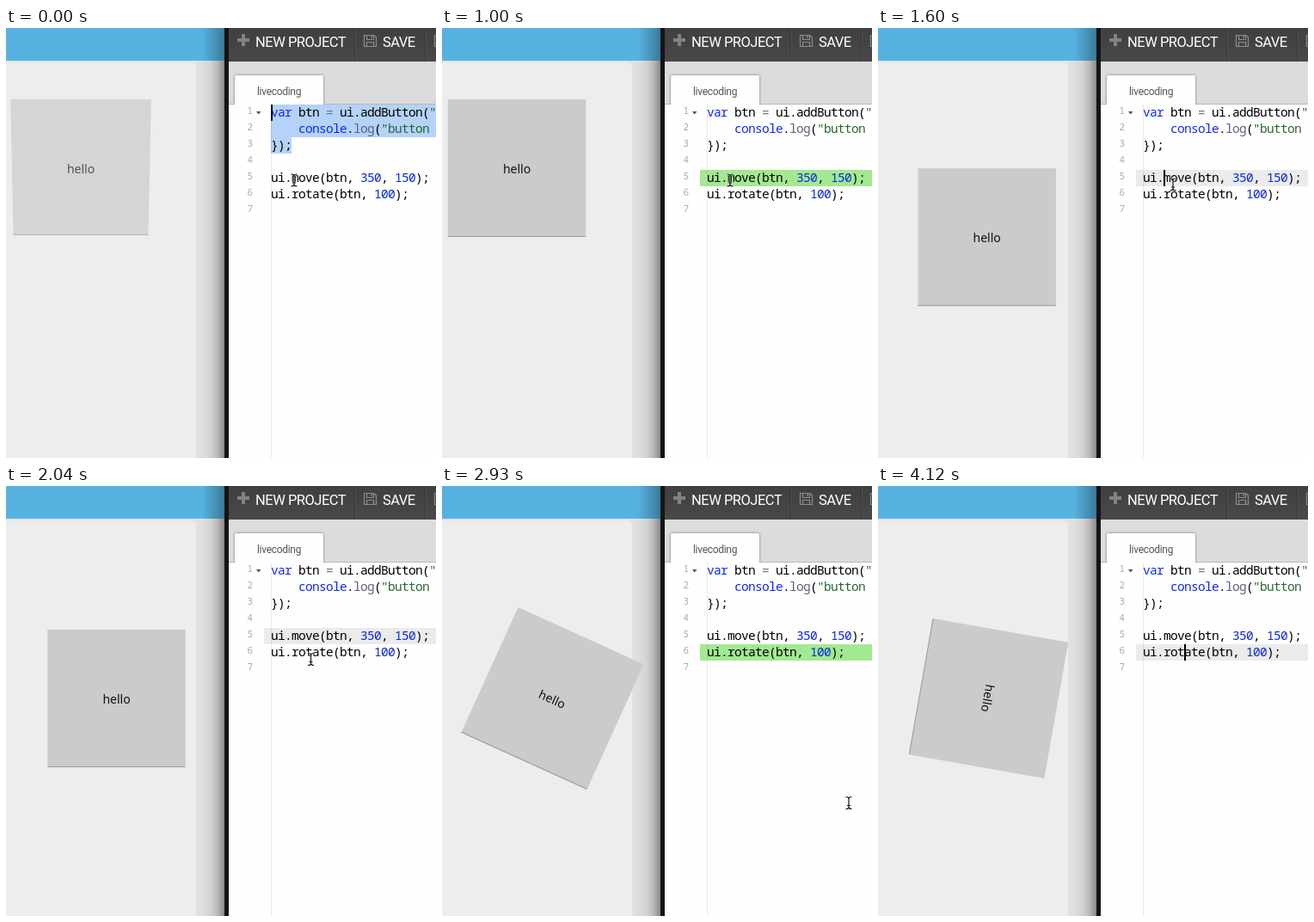
These frames come from a looping animation (500 px wide and 500 px high, 4.45 s). An HTML page:

```html
<!DOCTYPE html>
<html lang="en">
<head>
<meta charset="utf-8">
<title>Live coding</title>
<style>
  html, body { margin: 0; width: 100%; height: 100%; overflow: hidden; }
  svg { display: block; width: 500px; height: 500px; }
  .menu { font: 16.5px Roboto, sans-serif; letter-spacing: -.5px; fill: #fff; }
  .tab { font: 12px Roboto, sans-serif; letter-spacing: -.3px; fill: #555; }
  .hello { font: 14px "Noto Sans", sans-serif; text-anchor: middle; fill: #111; }
  .code { font: 14.5px "Noto Sans Mono", monospace; letter-spacing: -.7px; white-space: pre; fill: #000; }
  .numbers { font: 11px "Noto Sans Mono", monospace; text-anchor: end; fill: #aaa; }
  .keyword { fill: #1028f4; }
  .number { fill: #0a28dc; }
  .method { fill: #5a6280; }
  .operator { fill: #687687; }
  .string { fill: #24682a; }
</style>
</head>
<body>
<svg viewBox="0 0 500 500">
  <defs>
    <linearGradient id="edge">
      <stop offset="0" stop-color="#e2e2e2"/>
      <stop offset=".24" stop-color="#dddddd"/>
      <stop offset=".5" stop-color="#d4d4d4"/>
      <stop offset=".75" stop-color="#bababa"/>
      <stop offset="1" stop-color="#888"/>
    </linearGradient>
    <linearGradient id="shade">
      <stop offset="0" stop-opacity="0"/>
      <stop offset="1" stop-opacity=".32"/>
    </linearGradient>
    <linearGradient id="toolbar" x2="0" y2="1">
      <stop offset="0" stop-color="#404040"/>
      <stop offset="1" stop-color="#484848"/>
    </linearGradient>
    <filter id="tabShadow"><feDropShadow dx="0" dy="0" stdDeviation="1.5" flood-opacity=".5"/></filter>
  </defs>

  <!-- Device preview -->
  <rect width="254" height="500" fill="#e2e2e2"/>
  <rect x="221" y="38" width="33" height="462" fill="url(#edge)"/>
  <path d="M0 40H215Q221 40 221 47V500H0Z" fill="#ededed"/>
  <rect width="254" height="38" fill="#56b3e1"/>
  <rect x="228" width="26" height="38" fill="url(#shade)"/>
  <g id="button">
    <path id="face" fill="#cbcbcb"/>
    <path id="rim" fill="none" stroke="#9c9c9c"/>
    <text class="hello" y="6">hello</text>
  </g>
  <rect x="254" width="5" height="500" fill="#141414"/>

  <!-- Editor -->
  <rect x="259" width="241" height="500" fill="#fefefe"/>
  <rect x="259" y="39" width="241" height="50" fill="#dcdcdc"/>
  <rect x="259" y="88" width="241" height="1" fill="#b8b8b8"/>
  <path d="M266 89V58Q266 55 269 55H366Q369 55 369 58V89Z" fill="#fefefe" filter="url(#tabShadow)"/>
  <rect x="259" y="89" width="241" height="6" fill="#fefefe"/>
  <text class="tab" x="292" y="78">livecoding</text>

  <rect x="259" width="241" height="39" fill="url(#toolbar)"/>
  <path d="M405.5 0V39M487.5 0V39" stroke="#383838"/>
  <path d="M406.5 0V39M488.5 0V39" stroke="#505050"/>
  <path d="M276 7V21M269 14H283" stroke="#828282" stroke-width="4"/>
  <path d="M416.5 8.5H428L430.5 11V21.5H416.5ZM419.5 8.5V13.5H427.5V8.5M419.5 21.5V16.5H427.5V21.5M425 9V12M500 8.5H498.5V21.5H500"
        fill="none" stroke="#8c8c8c" stroke-width="1.2"/>
  <text class="menu" x="290" y="22">NEW PROJECT</text>
  <text class="menu" x="438" y="22">SAVE</text>

  <path id="selection" d="M308 89H500V127H332V146H308Z" fill="#b5d2fa"/>
  <rect id="activeLine" x="300" width="200" height="19"/>
  <path d="M308.5 89V500" stroke="#000" stroke-opacity=".08"/>
  <g id="lineNumbers" class="numbers"></g>
  <path d="M291 97H296.500L293.750 100.500Z" fill="#555"/>
  <g class="code">
    <text x="308" y="103"><tspan class="keyword">var</tspan> btn <tspan class="operator">=</tspan> ui.addButton(<tspan class="string">"</tspan></text>
    <text x="340" y="122"><tspan class="keyword">console</tspan>.<tspan class="method">log</tspan>(<tspan class="string">"button</tspan></text>
    <text x="308" y="141">});</text>
    <text x="308" y="179">ui.move(btn, <tspan class="number">350</tspan>, <tspan class="number">150</tspan>);</text>
    <text x="308" y="198">ui.rotate(btn, <tspan class="number">100</tspan>);</text>
  </g>
  <rect id="caret" width="2" height="19"/>
  <g id="pointer" fill="none">
    <path d="M-3.500-7Q0-7 0-5Q0-7 3.500-7M0-5V5M-3.500 7Q0 7 0 5Q0 7 3.500 7M-2 3H2" stroke="#fff" stroke-width="2.500" stroke-opacity=".7"/>
    <path d="M-3.500-7Q0-7 0-5Q0-7 3.500-7M0-5V5M-3.500 7Q0 7 0 5Q0 7 3.500 7M-2 3H2" stroke="#111" stroke-width="1.200"/>
  </g>
</svg>
<script>
const LOOP = 4450;
const GRAY = '#ebebeb', GREEN = '#a3e991';
const el = id => document.getElementById(id);
const rowTop = row => 70 + 19 * row;

// Each step changes only the listed properties and holds until the next one.
const steps = [
  [0, { tilt: 1, selected: true, row: 1, col: 0, caret: true, line: 'none', pointer: [335, 177] }],
  [150, { tilt: .25 }],
  [270, { tilt: 0, caret: false }],
  [410, { selected: false, row: 5, col: 3, caret: true, line: GRAY }],
  [1000, { caret: false, line: GREEN }],
  [1300, { caret: true, pointer: [336, 177] }],
  [1450, { line: GRAY }],
  [1600, { pointer: [343, 182] }],
  [1750, { pointer: [351, 190] }],
  [1890, { caret: false, pointer: [353.5, 194.5] }],
  [2040, { pointer: [354.5, 201.5] }],
  [2190, { row: 6, col: 6, caret: true }],
  [2640, { line: GREEN }],
  [2780, { caret: false, pointer: [362, 206.5] }],
  [2930, { pointer: [473, 368.5] }],
  [3080, { line: GRAY }],
  [3230, { caret: true, pointer: [490.5, 463] }],
  [3380, { pointer: null }],
  [3670, { caret: false }],
  [4120, { caret: true }]
];

function ease(time, start, duration) {
  const p = Math.min(1, Math.max(0, (time - start) / duration));
  return (1 - Math.cos(Math.PI * p)) / 2;
}

function show(id, visible) {
  el(id).style.display = visible ? '' : 'none';
}

function drawButton(time, tilt) {
  const moved = ease(time, 1203, 460);
  const angle = 100 * ease(time, 2772, 480);
  const top = 80.25 + 1.5 * tilt, bottom = 80.25 - 1.75 * tilt, base = 80 - 2 * tilt;
  el('button').setAttribute('transform',
    `translate(${87 + 41.5 * moved} ${163 + 84 * moved}) rotate(${angle})`);
  el('button').setAttribute('opacity', 1 - .3 * tilt);
  el('face').setAttribute('d', `M${-top}-80H${top}L${bottom} ${base}H${-bottom}Z`);
  el('rim').setAttribute('d', `M${-bottom} ${base - .5}H${bottom}`);
}

function draw() {
  const now = performance.now() % LOOP;
  const past = steps.filter(([start]) => start <= now);
  const state = Object.assign({}, ...past.map(([, change]) => change));

  drawButton(past[past.length - 1][0], state.tilt);
  show('selection', state.selected);
  el('activeLine').setAttribute('y', rowTop(state.row));
  el('activeLine').setAttribute('fill', state.line);
  el('caret').setAttribute('x', 308 + 8 * state.col);
  el('caret').setAttribute('y', rowTop(state.row));
  show('caret', state.caret);
  show('pointer', state.pointer);
  if (state.pointer) el('pointer').setAttribute('transform', `translate(${state.pointer})`);
  requestAnimationFrame(draw);
}

el('lineNumbers').innerHTML = [1, 2, 3, 4, 5, 6, 7]
  .map(n => `<text x="287" y="${rowTop(n) + 11}">${n}</text>`).join('');
draw();
</script>
</body>
</html>
```
